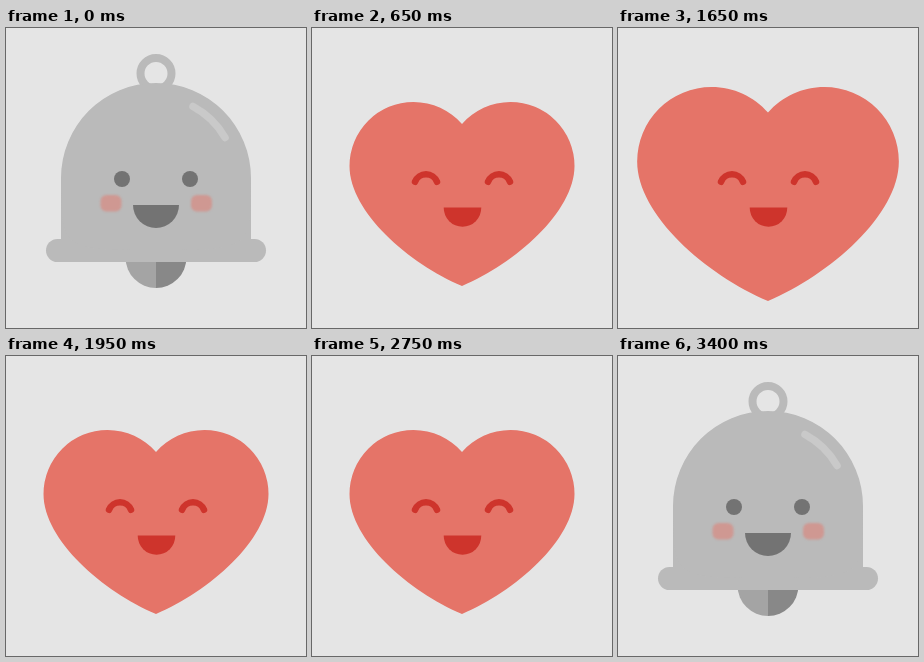
Animation of 300x300 px, one loop 4900 ms. Source, as an HTML page:

```html
<!DOCTYPE html>
<html lang="en">
<head>
<meta charset="utf-8">
<title>Bell and heart</title>
<style>
  html, body { margin: 0; width: 100%; height: 100%; overflow: hidden; background: #e5e5e5; }
  svg { display: block; width: 100%; height: 100%; }
  .cheek { fill: #cf9892; filter: blur(1.3px); }
</style>
</head>
<body>
<svg viewBox="0 0 300 300">
  <g id="extras">
    <circle cx="150" cy="45.5" r="15.5" fill="none" stroke="#bababa" stroke-width="8"/>
    <path d="M150 199a30.5 30.5 0 0 0 0 61z" fill="#a4a4a4"/>
    <path d="M150 199a30.5 30.5 0 0 1 0 61z" fill="#888"/>
    <g fill="#bababa">
      <rect x="55" y="150" width="190" height="75"/>
      <rect x="40" y="211" width="220" height="23" rx="11.5"/>
    </g>
  </g>
  <path id="body"/>
  <g id="bellFace">
    <path d="M187 78.5A80.5 80.5 0 0 1 219 109.5" fill="none" stroke="#c9c9c9" stroke-width="7.5" stroke-linecap="round"/>
    <rect class="cheek" x="94.5" y="167" width="21" height="16.5" rx="6"/>
    <rect class="cheek" x="185" y="167" width="21" height="16.5" rx="6"/>
    <g fill="#737373">
      <circle cx="116" cy="151" r="8"/>
      <circle cx="184" cy="151" r="8"/>
      <path d="M127 177h46a23 23 0 0 1-46 0z"/>
    </g>
  </g>
  <g id="heartFace" fill="#ce342c">
    <path d="M103 153.8a11.8 11.8 0 0 1 22 0M176 153.8a11.8 11.8 0 0 1 22 0" fill="none" stroke="#ce342c" stroke-width="6.5" stroke-linecap="round"/>
    <path d="M131.7 179.5h37.6a18.8 19.3 0 0 1-37.6 0z"/>
  </g>
</svg>
<script>
const LOOP = 4900, MID = 150;
const RED = { r: 229, g: 116, b: 104 }, GREY = { r: 186, g: 186, b: 186 };

// lobe, side and spread are distances from the middle line; drop and rise are handle lengths
const heart = { notch: 96, lobe: 48.5, top: 74, side: 112.5, mid: 138, drop: 46, spread: 53, rise: 22.5, bottom: 258 };
const soft = { ...heart, notch: 88, drop: 42, rise: 6 };
const dome = { notch: 55, lobe: 0, top: 55, side: 95, mid: 150, drop: 72, spread: 95, rise: 0, bottom: 222 };

const $ = id => document.getElementById(id);
const show = (id, on) => $(id).setAttribute("visibility", on ? "visible" : "hidden");
const zoom = (id, cy, s) =>
  $(id).setAttribute("transform", `translate(${MID} ${cy}) scale(${s}) translate(${-MID} ${-cy})`);
const mix = (a, b, k) =>
  Object.fromEntries(Object.keys(a).map(key => [key, a[key] + (b[key] - a[key]) * k]));

// One half: notch to lobe top, a quarter ellipse to the side, then a curve to the tip
function half(p, dir) {
  const at = (x, y) => `${MID + dir * x} ${y} `;
  return "M" + at(0, p.notch) +
    "C" + at(p.lobe * 0.25, p.notch - (p.notch - p.top) * 0.63) + at(p.lobe * 0.61, p.top) + at(p.lobe, p.top) +
    `A${p.side - p.lobe} ${p.mid - p.top} 0 0 ${dir > 0 ? 1 : 0} ` + at(p.side, p.mid) +
    "C" + at(p.side, p.mid + p.drop) + at(p.spread, p.bottom - p.rise) + at(0, p.bottom) + "Z";
}

// 1 is the bell, 0 the softened heart, -1 the full heart
function bellness(t) {
  if (t < 500 || t >= 3400) return 1;
  if (t < 650) return (2 - Math.floor((t - 500) / 50)) / 3;
  if (t >= 3250) return Math.floor((t - 3250) / 50) / 3;
  return -1;
}

// Every 800 ms two swells of 100 ms, 100 ms apart
function swollen(t) {
  const u = (t - 850) % 800;
  return t >= 850 && t < 3250 && u < 300 && u % 200 < 100;
}

function draw(t) {
  const k = bellness(t), isBell = k > 0.5;
  const shape = k < 0 ? heart : mix(soft, dome, k);
  const { r, g, b } = mix(RED, GREY, Math.max(k, 0));
  $("body").setAttribute("d", half(shape, -1) + half(shape, 1));
  $("body").setAttribute("fill", `rgb(${r} ${g} ${b})`);
  zoom("body", 166, swollen(t) ? 1.163 : 1);
  zoom("extras", 150, k);
  show("extras", isBell);
  show("bellFace", isBell);
  show("heartFace", !isBell);
}

const begin = performance.now();
function tick() {
  draw((performance.now() - begin) % LOOP);
  requestAnimationFrame(tick);
}
tick();
</script>
</body>
</html>
```
